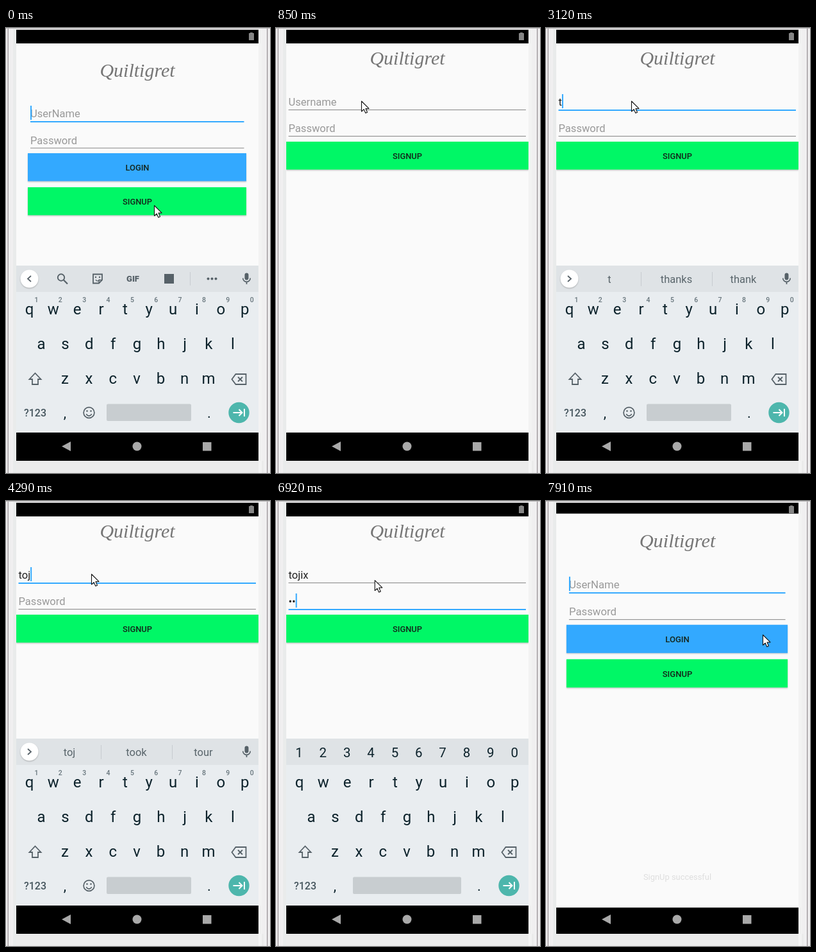
Write an HTML page with a canvas that moves like this. It is 412 px wide and 693 px high and loops after 8 s.

```html
<!DOCTYPE html>
<html lang="en">
<head>
<meta charset="utf-8">
<title>Sign-up flow</title>
<style>
html, body { margin: 0; width: 100%; height: 100%; overflow: hidden; background: #efeeef; }
canvas { display: block; width: 412px; height: 693px; }
</style>
</head>
<body>
<canvas id="stage"></canvas>
<script>
const W = 412, H = 693, LOOP = 8000;
const SCREEN = { x: 16, y: 2.5, w: 378, h: 671.5 };
const TOP = 24, BOTTOM = 630;
const BLUE = '#33a9ff', GREEN = '#00f766', HINT = '#999', INK = '#212121';
const KEY = '#0c222b', ICON = '#566168';
const BRAND = 'Quiltigret', USER = 'tojix';

const TICKS = [0, 150, 290, 420, 560, 710, 850, 980, 1120, 1270, 1420, 1540,
  2110, 2540, 3120, 3270, 3700, 4140, 4280, 4410, 4690, 5150, 5720, 6180, 6330,
  6920, 7060, 7200, 7340, 7490, 7630, 7770, 7910];
const TYPED = [3120, 3270, 4140, 4410, 4690];
const WORDS = [
  ['t', 'thanks', 'thank'], ['to', 'today', 'too'], ['toj', 'took', 'tour'],
  ['toji', 'today', 'top'], ['tojix', 'topics', 'toxic']
];

const canvas = document.getElementById('stage');
const c = canvas.getContext('2d');
const dpr = window.devicePixelRatio || 1;
canvas.width = W * dpr;
canvas.height = H * dpr;

const clamp = v => Math.max(0, Math.min(1, v));
const mix = (a, b, k) => a + (b - a) * k;
const span = (t, a, b) => clamp((t - a) / (b - a));
const easeOut = k => 1 - (1 - k) ** 3;
const easeInOut = k => k * k * (3 - 2 * k);
const within = (t, a, b) => t >= a && t < b;
const typedCount = t => TYPED.filter(k => t >= k).length;

function rect(x, y, w, h, color) {
  c.fillStyle = color;
  c.fillRect(x, y, w, h);
}

function disc(x, y, r, color) {
  c.fillStyle = color;
  c.beginPath();
  c.arc(x, y, r, 0, 7);
  c.fill();
}

function text(s, x, y, size, color, { align = 'center', weight = 400 } = {}) {
  c.font = `${weight} ${size}px Roboto, sans-serif`;
  c.textAlign = align;
  c.fillStyle = color;
  c.fillText(s, x, y);
}

function poly(points, color, width, closed) {
  c.beginPath();
  points.forEach(([x, y]) => c.lineTo(x, y));
  if (closed) c.closePath();
  if (width) {
    c.strokeStyle = color;
    c.lineWidth = width;
    c.stroke();
  } else {
    c.fillStyle = color;
    c.fill();
  }
}

function ring(x, y, r, color, width, from = 0, to = 7) {
  c.strokeStyle = color;
  c.lineWidth = width;
  c.beginPath();
  c.arc(x, y, r, from, to);
  c.stroke();
}

function at(x, y, draw) {
  c.save();
  c.translate(x, y);
  draw();
  c.restore();
}

function zoomed(scale, alpha, cy, draw) {
  c.save();
  c.globalAlpha = alpha;
  c.translate(205, cy);
  c.scale(scale, scale);
  c.translate(-205, -cy);
  draw();
  c.restore();
}

// ---- Phone ----
function drawShell() {
  rect(0, 0, W, H, '#f0eff0');
  rect(11, 674, 391, 19, '#ebebeb');
  rect(11, 1, 5, 692, '#e9ebeb');
  rect(394, 1, 5, 692, '#f3f3f3');
  rect(2, 0, 1, H, '#c9c4c6');
  rect(3, 0, 1, H, '#a39ea1');
  rect(407, 0, 1, H, '#a39ea1');
  rect(408, 0, 1, H, '#c9c4c6');
  rect(0, 0, W, 1, '#bdbbbc');
}

function drawSystemIcons() {
  rect(381, 7, 4, 2, '#858585');
  rect(379, 8, 8, 11, '#858585');
  poly([[87, 651.5], [101, 644], [101, 659]], '#a9a9a9');
  disc(204.5, 651.5, 7, '#a9a9a9');
  rect(307, 645, 13.5, 13.5, '#a9a9a9');
}

// ---- Pages ----
// Wider than the screen, so a shrunken page leaves no gap at the sides.
function drawPaper() {
  rect(-8, TOP, 428, BOTTOM - TOP, '#fafafa');
}

function drawBrand(y) {
  c.font = 'italic 400 30px "Liberation Serif", serif';
  c.textAlign = 'center';
  c.fillStyle = '#757575';
  c.fillText(BRAND, 205, y);
}

function drawField(x, right, base, { hint, value = '', focus, caret }) {
  text(value || hint, x, base, 16.56, value ? INK : HINT, { align: 'left' });
  const dx = value ? c.measureText(value).width : 0;
  rect(x, base + 6, right - x, focus ? 2 : 1, focus ? BLUE : '#858585');
  if (caret) rect(x + dx, base - 18, 2, 22, BLUE);
}

function drawButton(x, y, w, label, color, pressed) {
  c.save();
  c.shadowColor = 'rgba(0,0,0,.2)';
  c.shadowBlur = 2 * dpr;
  c.shadowOffsetY = 1.2 * dpr;
  rect(x, y, w, 43.5, color);
  c.restore();
  if (pressed) rect(x, y, w, 43.5, 'rgba(0,0,0,.1)');
  text(label, 205, y + 27, 12.9, '#14241a', { weight: 500 });
}

function drawLogin(pressed) {
  drawPaper();
  drawBrand(76);
  drawField(38, 371.5, 139, { hint: 'UserName', focus: true, caret: true });
  drawField(38, 371.5, 180.5, { hint: 'Password' });
  drawButton(34, 195, 341, 'LOGIN', BLUE);
  drawButton(34, 248, 341, 'SIGNUP', GREEN, pressed);
}

function drawSignup(t) {
  const cleared = t >= 7630;
  const secret = t < 6180 ? '' : t < 6330 ? '•' : '••';
  const blink = !within(t, 2110, 2540) && !within(t, 3700, 4140) && !within(t, 5720, 6180);
  const onName = within(t, 1270, 5150), onPass = t >= 5150;
  drawPaper();
  drawBrand(57);
  drawField(19.5, 390, 121, {
    hint: 'Username', value: cleared ? '' : USER.slice(0, typedCount(t)),
    focus: onName, caret: onName && blink
  });
  drawField(19.5, 390, 162, {
    hint: 'Password', value: cleared ? '' : secret,
    focus: onPass, caret: onPass && blink
  });
  drawButton(16, 177, 378, 'SIGNUP', GREEN, within(t, 7490, 7630));
}

// ---- Keyboard ----
function keyRow(keys, x, base, size = 24) {
  [...keys].forEach((k, i) => text(k, x + i * 37.35, base, size, KEY));
}

function drawChevron(dir) {
  c.save();
  c.shadowColor = 'rgba(0,0,0,.25)';
  c.shadowBlur = 2 * dpr;
  c.shadowOffsetY = dpr;
  disc(36.5, 390.5, 14, '#fff');
  c.restore();
  poly([[36.5 - dir * 2.5, 386], [36.5 + dir * 2.5, 390.5], [36.5 - dir * 2.5, 395]], ICON, 1.8);
}

function drawMic() {
  at(375.5, 390, () => {
    c.fillStyle = ICON;
    c.beginPath();
    c.roundRect(-3, -8.5, 6, 11, 3);
    c.fill();
    ring(0, -0.5, 5.8, ICON, 1.6, 0, Math.PI);
    rect(-0.9, 5, 1.8, 4, ICON);
  });
}

function drawTools() {
  drawChevron(-1);
  ring(86, 388.5, 5.2, ICON, 1.9);
  poly([[90, 392.5], [96, 398.5]], ICON, 2.2);
  at(143, 390.5, () => {
    poly([[-7, -7], [7, -7], [7, 2], [2, 7], [-7, 7]], ICON, 1.8, true);
    poly([[7, 2], [2, 2], [2, 7]], ICON, 1.4);
    disc(-3, -2.5, 1.2, ICON);
    disc(3, -2.5, 1.2, ICON);
    ring(0, 0, 3.3, ICON, 1.3, 0.4, 2.7);
  });
  text('GIF', 198, 395, 13, ICON, { weight: 900 });
  rect(247, 383, 15, 15, ICON);
  rect(287, 380, 1, 21, '#c7ccd0');
  for (const x of [315.5, 321.5, 327.5]) disc(x, 390.5, 2, ICON);
  drawMic();
}

function drawWords(words) {
  drawChevron(1);
  [99, 203.5, 308].forEach((x, i) => text(words[i], x, 397, 16.5, '#59656b'));
  rect(148, 380, 1, 22, '#c7ccd0');
  rect(259, 380, 1, 22, '#c7ccd0');
  drawMic();
}

function drawKeyboard(words, secret) {
  rect(8, 370, 386, BOTTOM - 370, '#e9edf0');
  rect(8, 370, 386, 41, '#dfe3e6');
  if (secret) keyRow('1234567890', 36, 399, 20.5);
  else if (words) drawWords(words);
  else drawTools();

  keyRow('qwertyuiop', 36.5, 445.5);
  if (!secret) {
    [...'1234567890'].forEach((d, i) =>
      text(d, 47.5 + i * 37.35, 427, 10.5, '#66747b', { weight: 500 }));
  }
  keyRow('asdfghjkl', 55, 500);
  keyRow('zxcvbnm', 92, 553.5);

  at(45.5, 546.5, () => poly(
    [[0, -9], [9, 0.5], [4.5, 0.5], [4.5, 8.5], [-4.5, 8.5], [-4.5, 0.5], [-9, 0.5]], ICON, 1.8, true));
  at(363.5, 547, () => {
    poly([[-11, 0], [-5, -8], [11, -8], [11, 8], [-5, 8]], ICON, 1.8, true);
    poly([[-1.5, -3.5], [5.5, 3.5]], ICON, 1.8);
    poly([[-1.5, 3.5], [5.5, -3.5]], ICON, 1.8);
  });

  text('?123', 45.5, 605, 16, '#46565e', { weight: 500 });
  text(',', 92, 606.5, 22, KEY);
  text('.', 317, 606.5, 22, KEY);
  if (!secret) {
    at(129.5, 599, () => {
      ring(0, 0, 8.4, ICON, 1.7);
      disc(-3, -2.5, 1.3, ICON);
      disc(3, -2.5, 1.3, ICON);
      ring(0, 0.5, 4.4, ICON, 1.6, 0.35, 2.8);
    });
  }
  const left = secret ? 120 : 157;
  c.fillStyle = '#c8cdd0';
  c.beginPath();
  c.roundRect(left, 585.5, 289 - left, 26.5, 2);
  c.fill();

  disc(363.5, 599, 16.2, '#4db6ac');
  at(363.5, 599, () => {
    poly([[-9, 0], [5, 0]], '#fff', 2);
    poly([[0, -5], [5, 0], [0, 5]], '#fff', 2);
    poly([[8.5, -6], [8.5, 6]], '#fff', 2);
  });
}

function raiseKeyboard(k, words, secret) {
  if (k <= 0) return;
  c.save();
  c.beginPath();
  c.rect(8, TOP, 396, BOTTOM - TOP);
  c.clip();
  c.translate(0, (BOTTOM - 370) * (1 - k));
  drawKeyboard(words, secret);
  c.restore();
}

// ---- Pointer ----
function drawPointer(t) {
  const go = easeInOut(span(t, 290, 850)), back = easeInOut(span(t, 6780, 7490));
  const x = mix(mix(231.5, 133.5, go), 338.5, back);
  const y = mix(mix(276.5, 114, go), 208.5, back);
  at(x, y, () => {
    const shape = [[0, 0], [0, 16], [3.7, 12.6], [6.3, 18.5], [9, 17.3], [6.5, 11.6], [11.5, 11.4]];
    c.lineJoin = 'round';
    poly(shape, '#fff');
    poly(shape, '#111', 1.1, true);
    c.lineJoin = 'miter';
  });
}

function drawScreen(t) {
  rect(SCREEN.x, SCREEN.y, SCREEN.w, SCREEN.h, '#000');
  if (t >= 7910) {
    zoomed(1.0125, 1, 375, () => drawLogin());
    text('SignUp successful', 205, 590, 12.9, '#dedede');
    return;
  }
  const open = easeOut(span(t, 150, 710));
  if (open < 1) {
    zoomed(1 + 0.05 * open, 1, 375, () => drawLogin(within(t, 150, 290)));
    raiseKeyboard(1 - span(t, 150, 420));
  }
  if (open > 0) {
    zoomed(t >= 7770 ? 0.997 : mix(0.9, 1, open), open, 326.5, () => {
      drawSignup(t);
      raiseKeyboard(easeOut(span(t, 1200, 1420)), WORDS[typedCount(t) - 1], t >= 5150);
    });
  }
}

function draw(t) {
  c.setTransform(dpr, 0, 0, dpr, 0, 0);
  drawShell();
  c.save();
  c.beginPath();
  c.rect(SCREEN.x, SCREEN.y, SCREEN.w, SCREEN.h);
  c.clip();
  drawScreen(t);
  drawSystemIcons();
  c.restore();
  drawPointer(t);
}

const start = performance.now();
function tick() {
  const now = (performance.now() - start) % LOOP;
  draw(TICKS.findLast(k => k <= now) ?? 0);
  requestAnimationFrame(tick);
}
tick();
</script>
</body>
</html>
```
